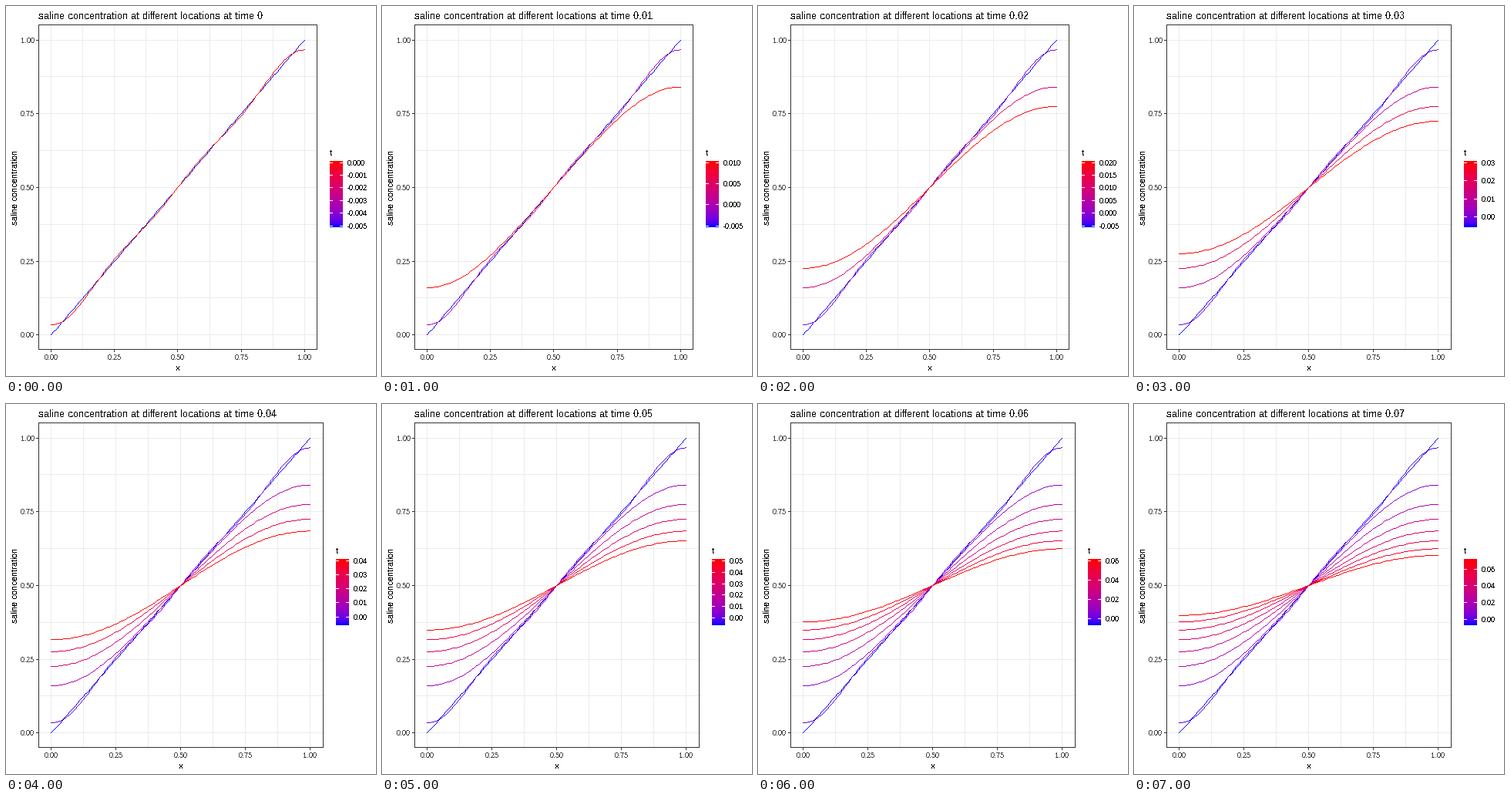
These frames come from a looping animation (480x480 px, 8000 ms). A matplotlib script:

```python
import numpy as np
import matplotlib.pyplot as plt
from matplotlib.animation import FuncAnimation
from matplotlib.collections import PolyCollection
from matplotlib.patches import Rectangle

plt.rcParams.update({
    "font.family": "Liberation Sans",
    "text.hinting": "native",
    "text.hinting_factor": 1,
    "text.antialiased": False,
})

SIZE = 480
LEFT, TOP, BOTTOM = 42.2, 24.9, 445.8
BAR_TOP, BAR_H, BAR_W, BINS = 201, 86.4, 17.28, 20
T_START = -0.005
LEGEND_STEPS = [0.001, 0.005, 0.005, 0.01, 0.01, 0.01, 0.02, 0.02]
GRID, DARK, TICK_TEXT = "#EBEBEB", "#333333", "#4D4D4D"
BLUE_LAB = np.array([32.30, 79.19, -107.86])
RED_LAB = np.array([53.24, 80.09, 67.20])

fig = plt.figure(figsize=(SIZE / 72, SIZE / 72), dpi=72, facecolor="white")
ax = fig.add_axes([0, 0, 1, 1])


def gradient(s):
    """Blue to red, mixed in CIE Lab, for s in 0..1."""
    s = np.clip(np.atleast_1d(s), 0, 1)[:, None]
    L, a, b = (BLUE_LAB + (RED_LAB - BLUE_LAB) * s).T
    fy = (L + 16) / 116
    f = np.stack([fy + a / 500, fy, fy - b / 200])
    xyz = np.where(f > 6 / 29, f ** 3, (f - 4 / 29) * 3 * (6 / 29) ** 2)
    xyz *= np.array([0.95047, 1, 1.08883])[:, None]
    to_rgb = np.array([[3.2406, -1.5372, -0.4986],
                       [-0.9689, 1.8758, 0.0415],
                       [0.0557, -0.2040, 1.0570]])
    lin = np.clip(to_rgb @ xyz, 0, 1)
    return np.where(lin > 0.0031308, 1.055 * lin ** (1 / 2.4) - 0.055, 12.92 * lin).T


def concentration(x, t):
    """Truncated Fourier solution of the diffusion equation."""
    if t < 0:
        return x
    terms = [np.exp(-2 * t * (n * np.pi) ** 2) * np.cos(n * np.pi * x) / n ** 2
             for n in (1, 3, 5)]
    return 0.5 - 4 / np.pi ** 2 * sum(terms)


def to_px(x, right):
    return LEFT + (right - LEFT) * (0.05 + x) / 1.1


def to_py(y):
    return BOTTOM - (BOTTOM - TOP) * (0.05 + y) / 1.1


def hard_line(px, py):
    """Cells of a one pixel wide polyline without smoothing."""
    px, py = np.floor(px), np.floor(py)
    cells = []
    for xa, ya, xb, yb in zip(px[:-1], py[:-1], px[1:], py[1:]):
        n = int(max(abs(xb - xa), abs(yb - ya), 1))
        k = np.arange(n + 1) / n
        xs = np.floor(xa + (xb - xa) * k + 0.5)
        ys = np.floor(ya + (yb - ya) * k + 0.5)
        cells += list(zip(xs, ys))
    return list(dict.fromkeys(cells))


def segment(x1, y1, x2, y2, color):
    # whole numbers snap to the centre of their own pixel
    ax.plot(np.floor([x1, x2]), np.floor([y1, y2]), color=color, lw=1,
            antialiased=False, solid_capstyle="butt")


def label(x, y, text, size, color="black", **kw):
    ax.text(x, y, text, fontsize=size, color=color, va="baseline", **kw)


def draw_panel(right):
    for k in list(range(1, 9, 2)) + list(range(0, 9, 2)):
        gx, gy = to_px(k / 8, right), to_py(k / 8)
        segment(gx, TOP, gx, BOTTOM, GRID)
        segment(LEFT, gy, right, gy, GRID)
        if k % 2 == 0:
            segment(gx, BOTTOM, gx, BOTTOM + 2.75, DARK)
            segment(LEFT - 2.75, gy, LEFT, gy, DARK)
            label(np.floor(gx) + 0.5, 459, f"{k / 8:.2f}", 9, TICK_TEXT, ha="center")
            label(37, np.floor(gy) + 4, f"{k / 8:.2f}", 9, TICK_TEXT, ha="right")


def draw_curves(times, right):
    x = np.linspace(0, 1, 101)
    shades = gradient((times - T_START) / (times[-1] - T_START))
    for t, shade in zip(times, shades):
        cells = hard_line(to_px(x, right), to_py(concentration(x, t)))
        squares = [[(c, r), (c + 1, r), (c + 1, r + 1), (c, r + 1)] for c, r in cells]
        ax.add_collection(PolyCollection(squares, facecolors=[shade], linewidths=0,
                                         antialiaseds=False, zorder=3), autolim=False)


def draw_legend(x, t, step):
    half = BAR_H / BINS / 2
    rows = np.arange(86) + 0.5
    shades = gradient(1 - (rows - half) / (BAR_H - 2 * half))
    ax.imshow(shades[:, None, :], extent=(x, x + 17, BAR_TOP + 86, BAR_TOP),
              interpolation="nearest", aspect="auto", zorder=2)
    label(x, 194, "t", 11)
    digits = 3 if step < 0.01 else 2
    for k in range(int(np.ceil(T_START / step - 1e-6)), int(t / step + 1e-6) + 1):
        s = (k * step - T_START) / (t - T_START)
        y = BAR_TOP + BAR_H - half - s * (BAR_H - 2 * half)
        segment(x, y, x + BAR_W / 5, y, "white")
        segment(x + BAR_W * 0.8, y, x + BAR_W, y, "white")
        label(x + 23, np.floor(y) + 4, f"{k * step:.{digits}f}", 9)


def draw(i):
    ax.clear()
    ax.axis("off")
    t = i / 100
    step = LEGEND_STEPS[i]
    shift = 0 if step < 0.01 else 8
    right = 403.72 + shift

    draw_panel(right)
    draw_curves(np.array([T_START] + [k / 100 for k in range(i + 1)]), right)
    left, top = int(LEFT), int(TOP)
    ax.add_patch(Rectangle((left, top), int(right) - left, int(BOTTOM) - top,
                           fill=False, ec=DARK, lw=1, antialiased=False, zorder=4))
    draw_legend(420 + shift, t, step)
    label(42, 17, f"saline concentration at different locations at time {t:g}", 13)
    label((LEFT + right) / 2 - 0.5, 473, "x", 11, ha="center")
    label(15, 235.5, "saline concentration", 11, ha="center", rotation=90,
          rotation_mode="anchor")
    ax.set_xlim(0, SIZE)
    ax.set_ylim(SIZE, 0)
    return []


anim = FuncAnimation(fig, draw, frames=8, interval=1000, init_func=lambda: [],
                     repeat=True, repeat_delay=0)
plt.show()
```
